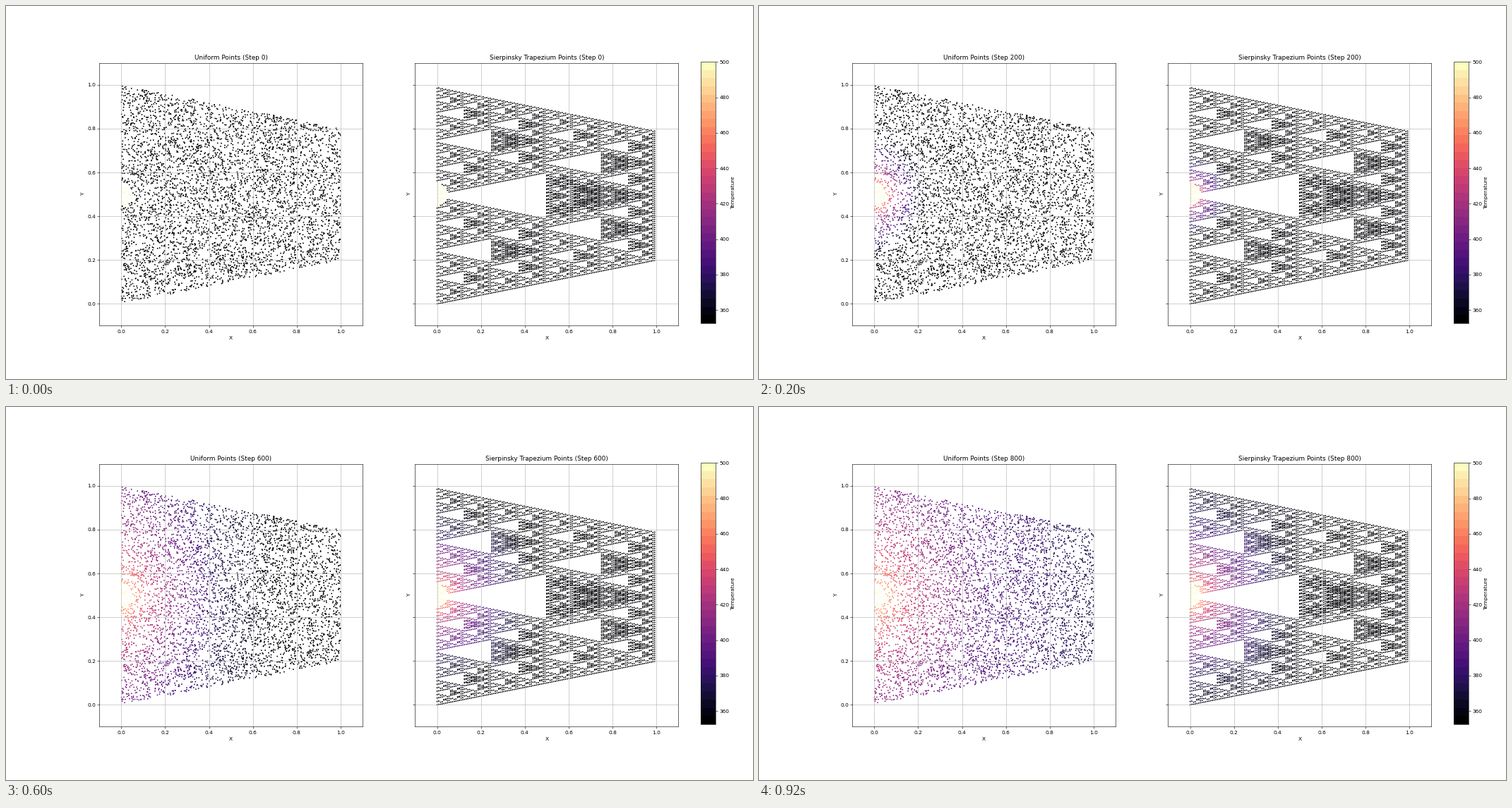
Write a matplotlib script that moves like this. It is 1058 by 529 pixels and loops after 1 s.

```python
import numpy as np
import matplotlib.pyplot as plt
from matplotlib.animation import FuncAnimation
from matplotlib.colors import Normalize

FRAMES, STEPS_PER_FRAME = 5, 200
T_MIN, T_HOT = 352.6, 500
HOT_RADIUS, REACH = 0.05, 0.5
NORM = Normalize(T_MIN, T_HOT)


def uniform_points(count, seed=42):
    rng = np.random.default_rng(seed)
    pts = rng.random((2 * count, 2))
    x, y = pts.T
    return pts[(y >= 0.2 * x) & (y <= 1 - 0.2 * x)][:count]


def trapezium_points(depth):
    """Repeatedly halve the set towards each corner of the trapezium."""
    corners = np.array([(0, 0), (0, 1), (1, 0.2), (1, 0.8)])
    pts = np.array([(0, 0), (0.5, 0.1)])
    for _ in range(depth):
        pts = np.concatenate([(pts + c) / 2 for c in corners])
    return pts


def spread(r, gain):
    return gain * np.log(REACH / np.clip(r, HOT_RADIUS, REACH))


def uniform_heat(x, dy, r, t):
    level = 416 - 277 * 0.35 ** t
    slope = 85 - 11 * (t - 2) ** 2
    return level - slope * x + spread(r, 28 + 40 / max(t, 1) ** 2)


def fractal_heat(x, dy, r, t):
    level = 374 - 190 * 0.42 ** t
    fade = 1 / max(t, 1) ** 2
    behind_gap = (x < 0.25) & (dy >= 0.25)
    return level - 26 * x + spread(r, 44 + 20 * fade) - 110 * fade * behind_gap


def temperature(pts, heat, t):
    x, dy = pts[:, 0], np.abs(pts[:, 1] - 0.5)
    r = np.hypot(x, dy)
    return np.where(r <= HOT_RADIUS, T_HOT, heat(x, dy, r, t))


fig, axes = plt.subplots(1, 2, figsize=(20, 10), dpi=52.9, sharey=True)
ticks = np.arange(0, 1.1, 0.2)
panels = []
for ax, name, pts, heat in (
        (axes[0], "Uniform Points", uniform_points(5000), uniform_heat),
        (axes[1], "Sierpinsky Trapezium Points", trapezium_points(6), fractal_heat)):
    dots = ax.scatter(*pts.T, c=temperature(pts, heat, 0), s=2,
                      cmap="magma", norm=NORM)
    ax.set(xlim=(-0.1, 1.1), ylim=(-0.1, 1.1), xticks=ticks, yticks=ticks,
           xlabel="X", ylabel="Y", aspect="equal")
    ax.grid(True)
    panels.append((ax, name, pts, heat, dots))

bar = plt.cm.ScalarMappable(NORM, plt.get_cmap("magma", 32))
cax = fig.add_axes([0.93, 0.15, 0.02, 0.7])
fig.colorbar(bar, cax=cax, label="Temperature", ticks=range(360, 501, 20))


def update(frame):
    for ax, name, pts, heat, dots in panels:
        dots.set_array(temperature(pts, heat, frame))
        ax.set_title(f"{name} (Step {frame * STEPS_PER_FRAME})")
    return []


anim = FuncAnimation(fig, update, frames=FRAMES, interval=200, repeat=True)
plt.show()
```
